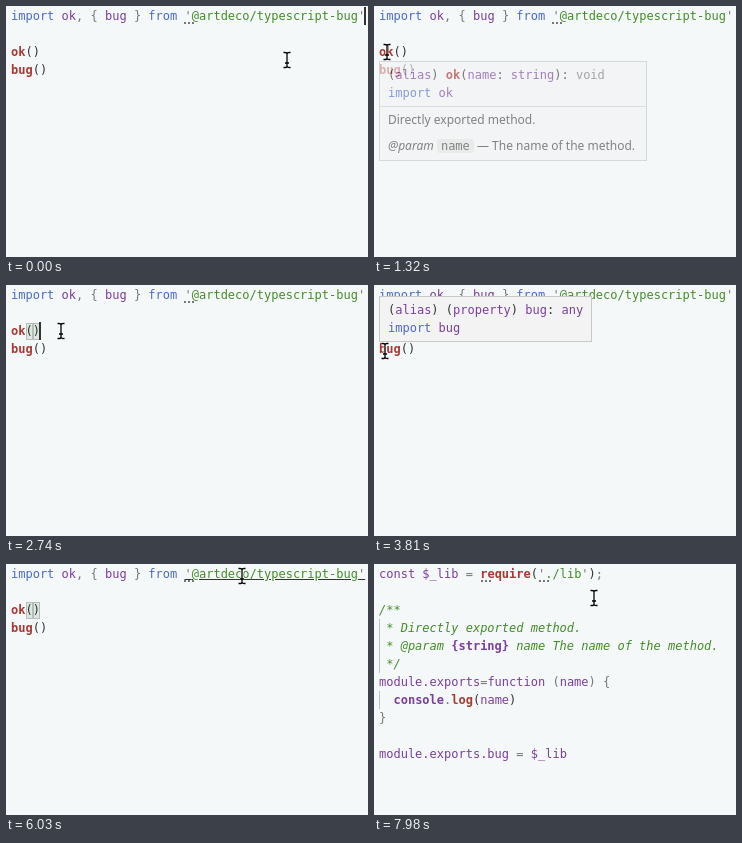
Write an HTML page that moves like this. It is 362 px wide and 251 px high and loops after 8 s.

```html
<!DOCTYPE html>
<html lang="en">
<head>
<meta charset="utf-8">
<title>Editor hover hints</title>
<style>
html, body { margin: 0; width: 100%; height: 100%; overflow: hidden; background: #f4f8f9; }
.stage { position: relative; width: 362px; height: 251px; overflow: hidden; }
.stage, pre { font: 12px/18px "DejaVu Sans Mono", monospace; color: #333; }
.stage div, pre, svg { position: absolute; margin: 0; white-space: pre; box-sizing: border-box; }
pre { left: 5px; top: 1px; }

/* syntax colours */
.k { color: #4b69c6; }
.v { color: #7a3e9d; }
.f { color: #aa3731; font-weight: bold; }
.s { color: #448c27; }
.p { color: #777; }
.c { color: #448c27; font-style: italic; }
.t { color: #7a3e9d; font-weight: bold; font-style: normal; }

.anim, .file { animation: 8s step-end infinite; }
#main { animation-name: main; }
#lib { animation-name: lib; }
@keyframes main { 0% { opacity: 1 } 77.6%, 100% { opacity: 0 } }
@keyframes lib { 0% { opacity: 0 } 77.6%, 100% { opacity: 1 } }

.link { animation: link 8s step-end infinite; }
@keyframes link {
  0%, 77.6%, 100% { text-decoration: none }
  70.95% { text-decoration: underline }
}

.hint { top: 16px; width: 2px; height: 1.5px; background: #777; box-shadow: 4px 0 #777, 8px 0 #777; }
.guide { left: 5px; width: 1px; background: #bcc0c0; }

.pair { top: 38px; width: 7.5px; height: 17px; border: 1px solid #b9bdb9; background: rgba(0, 100, 0, .1); animation-name: pair; }
@keyframes pair { 0%, 77.6%, 100% { opacity: 0 } 33.1% { opacity: 1 } }

.caret { width: 2px; height: 18px; background: #333; }
#end { left: 358px; top: 1px; animation-name: end; }
#mid { left: 33px; top: 37px; animation-name: mid; }
#home { left: 5px; top: 1px; animation-name: home; }
@keyframes end {
  0%, 7.5%, 19.85%, 32% { opacity: 1 }
  1.1%, 13.2%, 25.45%, 33.1%, 100% { opacity: 0 }
}
@keyframes mid {
  33.1%, 45.35%, 57.5%, 69.85% { opacity: 1 }
  0%, 39.7%, 51.5%, 63.2%, 75.35%, 100% { opacity: 0 }
}
@keyframes home {
  77.6%, 88.7% { opacity: 1 }
  0%, 83.2%, 95.45%, 100% { opacity: 0 }
}

.tip { left: 5px; background: #f3f3f3; border: 1px solid #c8c8c8; }
.tip div { left: 8px; }
#tipOk { top: 55px; width: 268px; height: 100px; animation-name: tipOk; }
#tipBug { top: 11px; width: 213px; height: 46px; animation-name: tipBug; }
@keyframes tipOk {
  0%, 29.8%, 100% { opacity: 0 }
  16.45% { opacity: .65 }
  17.6% { opacity: 1 }
}
@keyframes tipBug { 0%, 60.95%, 100% { opacity: 0 } 47.6% { opacity: 1 } }
.tip .rule { left: 0; right: 0; top: 44px; height: 1px; background: #d0d0d0; }
.doc { font-family: "Noto Sans", "Open Sans", sans-serif; color: #444; }
.doc code { font: 12px "DejaVu Sans Mono", monospace; padding: 0 4px; background: #e4e4e4; border-radius: 3px; }

#mouse { left: -6px; top: -10px; width: 12px; height: 20px; animation: mouse 8s infinite; }
@keyframes mouse {
  0% { transform: translate(281px, 54px); animation-timing-function: steps(2) }
  2.2%, 3.2% { transform: translate(89px, 147px); animation-timing-function: steps(9) }
  13.2%, 27.6% { transform: translate(13px, 46px); animation-timing-function: steps(6) }
  34.2% { transform: translate(55px, 46px); animation-timing-function: steps(4) }
  38.6% { transform: translate(22px, 72px); animation-timing-function: steps(3) }
  41.95%, 59.85% { transform: translate(11px, 66px); animation-timing-function: steps(2) }
  62.1% { transform: translate(28px, 77px); animation-timing-function: steps(6) }
  68.7% { transform: translate(223px, 22px); animation-timing-function: steps(2) }
  70.95%, 81% { transform: translate(236px, 12px); animation-timing-function: steps(3) }
  84.2% { transform: translate(237px, 46px); animation-timing-function: steps(4) }
  88.7%, 94.4% { transform: translate(245px, 41px); animation-timing-function: steps(5) }
  99.7%, 100% { transform: translate(220px, 34px) }
}
</style>
</head>
<body>
<div class="stage">
  <div id="main" class="file">
    <pre><span class="k">import</span> <span class="v">ok</span><span class="p">, {</span> <span class="v">bug</span> <span class="p">}</span> <span class="k">from</span> <span class="link"><span class="p">'</span><span class="s">@artdeco/typescript-bug</span><span class="p">'</span></span>

<span class="f">ok</span>()
<span class="f">bug</span>()</pre>
    <div class="hint" style="left:178px"></div>
  </div>

  <div id="lib" class="file">
    <pre><span class="v">const $_lib</span> <span class="p">=</span> <span class="f">require</span>(<span class="p">'</span><span class="s">./lib</span><span class="p">'</span>)<span class="p">;</span>

<span class="c">/**
 * Directly exported method.
 * @param <span class="t">{string}</span> name The name of the method.
 */</span>
<span class="v">module.exports</span><span class="p">=</span><span class="v">function</span> <span class="p">(</span><span class="v">name</span><span class="p">) {</span>
  <span class="t">console</span><span class="p">.</span><span class="f">log</span>(<span class="v">name</span>)
<span class="p">}</span>

<span class="v">module.exports.bug</span> <span class="p">=</span> <span class="v">$_lib</span></pre>
    <div class="hint" style="left:107px"></div>
    <div class="hint" style="left:165px"></div>
    <div class="guide" style="top:55px;height:54px"></div>
    <div class="guide" style="top:127px;height:18px"></div>
  </div>

  <div class="pair anim" style="left:19.5px"></div>
  <div class="pair anim" style="left:26.5px"></div>
  <div id="end" class="caret anim"></div>
  <div id="mid" class="caret anim"></div>
  <div id="home" class="caret anim"></div>

  <div id="tipOk" class="tip anim">
    <div style="top:4px">(<span class="v">alias</span>) <span class="f">ok</span>(<span class="v">name</span>: <span class="v">string</span>): <span class="p">void</span>
<span class="k">import</span> <span class="v">ok</span></div>
    <div class="rule"></div>
    <div class="doc" style="top:49px">Directly exported method.</div>
    <div class="doc" style="top:75px"><i>@param</i> <code>name</code> — The name of the method.</div>
  </div>
  <div id="tipBug" class="tip anim">
    <div style="top:4px">(<span class="v">alias</span>) (<span class="v">property</span>) <span class="v">bug</span>: <span class="v">any</span>
<span class="k">import</span> <span class="v">bug</span></div>
  </div>

  <svg id="mouse" viewBox="-6 -10 12 20" fill="none">
    <path id="beam" d="M-3.5 -7.5H-2Q0 -7.5 0 -6Q0 -7.5 2 -7.5H3.5M0 -6V6M-3.5 7.5H-2Q0 7.5 0 6Q0 7.5 2 7.5H3.5M-2 3H2" stroke="#fff" stroke-opacity=".8" stroke-width="3"/>
    <path d="M-3.5 -7.5H-2Q0 -7.5 0 -6Q0 -7.5 2 -7.5H3.5M0 -6V6M-3.5 7.5H-2Q0 7.5 0 6Q0 7.5 2 7.5H3.5M-2 3H2" stroke="#000" stroke-width="1.3"/>
  </svg>
</div>
</body>
</html>
```
